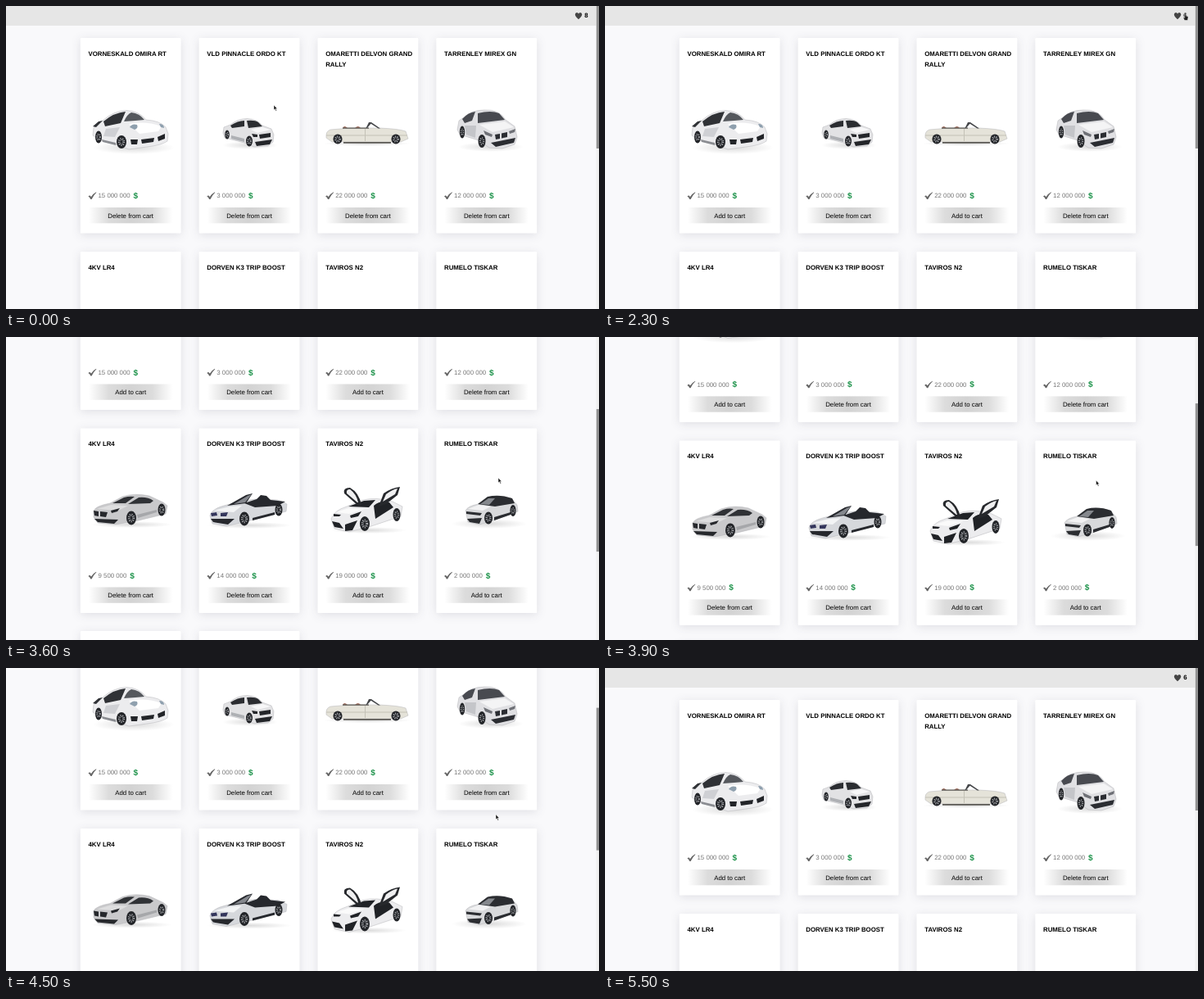
An HTML page for the animation above (5700 ms loop, 724 by 370 pixels).

```html
<!DOCTYPE html>
<html lang="en">
<head>
<meta charset="utf-8">
<title>Car shop</title>
<style>
  html, body { margin: 0; width: 100%; height: 100%; overflow: hidden; background: #f9f9fb; }
  svg { display: block; }
  text { font: 7.83px "Liberation Sans", Arial, sans-serif; white-space: pre; text-rendering: geometricPrecision; }
  .bold { font-weight: bold; }
  .card { fill: #fff; filter: drop-shadow(0 2px 6px rgba(30, 30, 60, .12)); }
  .price { fill: #777; }
  .dollar { font-size: 10px; font-weight: bold; fill: #1a9148; }
  .button { text-anchor: middle; }
</style>
</head>
<body>
<svg width="724" height="370" viewBox="0 0 724 370">
  <defs>
    <linearGradient id="fade">
      <stop offset="0" stop-color="#fff"/>
      <stop offset=".24" stop-color="#dcdcdc"/>
      <stop offset=".5" stop-color="#d3d3d3"/>
      <stop offset=".76" stop-color="#dcdcdc"/>
      <stop offset="1" stop-color="#fff"/>
    </linearGradient>
    <radialGradient id="shade">
      <stop offset="0" stop-color="#000" stop-opacity=".14"/>
      <stop offset="1" stop-color="#000" stop-opacity="0"/>
    </radialGradient>
  </defs>
  <g id="page">
    <rect width="724" height="24" fill="#e6e6e6"/>
    <path fill="#444" d="M699 16.2 Q694.8 12.8 694.8 10.3 Q694.9 8 697 7.9 Q698.5 8 699 9.4 Q699.6 8 701.1 7.9 Q703.2 8 703.3 10.3 Q703.2 12.8 699 16.2Z"/>
    <text id="count" class="bold" x="706.3" y="14.4">8</text>
    <g id="cards"></g>
  </g>
  <rect x="720.5" width="3.5" height="370" fill="#f0f0f0"/>
  <rect id="thumb" x="720.8" width="3.2" height="174" fill="#929292"/>
  <g id="cursor" stroke-linejoin="round">
    <path id="arrow" fill="#111" stroke="#fff" stroke-width=".5" d="M0 0 V6 L1.4 4.8 L2.5 7.3 L3.5 6.8 L2.4 4.5 H4.2Z"/>
    <path id="hand" fill="#222" stroke="#fff" stroke-width=".5" d="M-1.3 .8 Q-.5 -.6 .3 .8 V4 L2.6 4.7 Q3.2 5 3 6 L2.4 9.6 H-1.4 L-3 6.6 Q-2.8 5.4 -1.3 6.3Z"/>
    <path id="beam" fill="none" stroke="#111" stroke-width=".8" d="M-.9 .3 H2.1 M.6 .3 V6.4"/>
  </g>
</svg>
<script>
const LOOP = 5700, STEP = 100, PAGE = 792, VIEW = 370;
const $ = id => document.getElementById(id);

function add(parent, tag, attrs, text) {
  const el = document.createElementNS("http://www.w3.org/2000/svg", tag);
  for (const k in attrs) el.setAttribute(k, attrs[k]);
  if (text) el.textContent = text;
  return parent.appendChild(el);
}

// Each car: ground shadow, wheels (cx, cy, rx, ry) and flat shapes, body first.
const cars = [
  { shade: [156, 173, 50, 8], wheels: [[141, 166, 6, 8], [113, 160, 4, 7.5]], shapes: [
    ["#ececee", "M106 158 L107 149 Q110 143 118 140 Q131 128 147 127.5 Q162 128 171 139 Q188 140 195 148 L198 156 L197 165 Q190 170 172 172 L150 175 L134 169 L117 165Z"],
    ["#303236", "M119 141 Q132 130 146 129 L140 143 L121 147Z M106 147 L113 141 L118 140 L110 148Z"],
    ["#55585d", "M144 141 Q148 132 153 130 Q163 131 169 139 L158 140Z"],
    ["#cfd0d4", "M122 150 L139 148 L133 160 L119 159Z"],
    ["#8b8d92", "M117 163 L134 167 V170 L118 166Z"],
    ["#fff", "M150 144 Q170 140 190 147 L186 153 L163 156Z"],
    ["#8fa0ae", "M151 148 Q154 143 160 145 Q162 149 157 151Z M187 144 Q193 144 193 149 L189 148Z"],
    ["#222428", "M152 163 L161 163 L160 169 L153 169Z M165 163 L181 161 L180 166 L166 168Z M185 160 L194 156 L194 162 L186 165Z"]] },
  { shade: [298, 170, 34, 5], wheels: [[297, 165, 4, 6.5], [270, 157, 2.8, 5.5]], shapes: [
    ["#e2e2e4", "M265 155 L266 148 L274 145 Q282 138 294 137.5 Q307 138 313 146 L324 150 L327 157 L326 166 L320 171 L303 172 L291 167 L267 161Z"],
    ["#2b2d31", "M274 146 Q283 140 291 140 L291 147 L276 149Z M294 140 Q304 139 308 142 L313 147 L296 149Z"],
    ["#aeb0b4", "M275 158 L291 162 V166 L275 162Z"],
    ["#f7f7f8", "M299 151 L313 148 L323 151 L307 155Z"],
    ["#24262a", "M300 156 L307 157 V160 L302 160Z M309 157 L323 155 V160 L310 162Z M304 166 L325 163 L322 169 L306 171Z"]] },
  { shade: [441, 168, 54, 3], wheels: [[405, 162.5, 5.5, 6], [476, 162.5, 5.5, 6]], shapes: [
    ["#e5e3d9", "M391 161 Q390 153 396 151 L420 149 L456 149 Q480 150 488 153 L491 162 L482 166 H398Z"],
    ["#c4c1b6", "M391 157.5 H490 V158.5 H391Z M438 150 H439 V165 H438Z"],
    ["#9e6d5e", "M411 149 Q413 145 417 149 H426 Q430 145 433 149Z"],
    ["#5a5853", "M411 148.6 H443 V149.8 H411Z M412 166 H470 V167.8 H412Z"],
    ["#45474a", "M443 142 L446 142 L457 149.6 H454.5 L445.5 143.8 L441 149 H439.5Z"]] },
  { shade: [592, 172, 40, 6], wheels: [[581, 165, 4.5, 8], [557, 154, 3.2, 7.5]], shapes: [
    ["#e0e0e3", "M551 151 L553 140 L559 136 Q568 127 584 127 Q602 126 610 139 L621 147 L624 160 L621 169 L606 174 L590 173 L577 164 L554 157Z"],
    ["#484a50", "M557 138 Q564 130 573 129 L569 140 L560 143Z M576 131 Q592 127 602 131 L609 139 L576 143Z"],
    ["#c4c5c9", "M560 146 L574 146 L573 161 L562 157Z"],
    ["#f4f4f5", "M578 145 L609 141 L620 148 L594 154Z"],
    ["#6e7076", "M583 152 L594 157 L593 160 L585 157Z M614 153 L622 150 L621 154 L615 156Z"],
    ["#2b2d32", "M597 157 L603 156 V162 L598 163Z M605 155.5 L612 154 V160 L605 161.5Z M592 167 L622 161 L620 167 L598 172Z"]] },
  { shade: [153, 229, 50, 4], wheels: [[153, 221, 6, 8.5], [190, 211, 4.5, 7.5]], shapes: [
    ["#c9c9cb", "M107 212 Q110 206 127 203 L142 195 Q157 190 175 194 L192 202 L197 206 L195 216 L162 224 L134 229 L112 227 L107 220Z"],
    ["#303236", "M130 203 L144 196 Q151 194 157 195 L146 203Z M149 204 L162 196 Q173 195 180 200 L176 203Z"],
    ["#dededf", "M111 210 L128 205 L149 206 L137 212Z"],
    ["#a6a7aa", "M160 217 L184 211 V214 L161 221Z"],
    ["#26282c", "M107 212 L113 213 L113 219 L108 218Z M115 213 L124 214 L122 220 L115 219Z M128 212 L139 209 L136 213 L129 215Z M108 222 L137 223 L132 228 L112 226Z"]] },
  { shade: [297, 230, 52, 4], wheels: [[291, 222, 6, 8.5], [333, 211, 4.5, 7.5]], shapes: [
    ["#d6d8dc", "M249 218 Q251 210 266 206 L285 201 L304 198 L332 199 L343 204 L342 213 L299 224 L269 231 L252 228Z"],
    ["#26282d", "M270 206 L293 193 L301 191 L293 203Z M291 203 L306 198 L311 193 L318 194 L323 199 L341 201 L332 206 L304 208Z M250 222 L279 222 L271 229 L253 226Z M301 221 L328 214 V217 L301 224Z"],
    ["#84878d", "M295 194 L300 192 L292 202 L278 204Z"],
    ["#f3f4f5", "M253 212 L273 207 L288 206 L278 214Z"],
    ["#34365c", "M250 215 L257 214 L258 218 L251 219Z M262 215 L271 214 L269 219 L262 219Z"]] },
  { shade: [443, 236, 46, 4], wheels: [[438, 228, 6, 9], [477, 217, 4.5, 8]], shapes: [
    ["#ececee", "M397 222 Q400 212 416 207 L436 199 Q452 195 472 201 L484 207 L482 219 L446 231 L419 238 L401 234Z"],
    ["#202226", "M418 207 L437 200 L451 199 L443 208Z M449 206 Q457 199 468 202 L473 208 L451 222Z M398 225 L407 227 L412 234 L401 232Z M414 229 L429 224 L423 236 L414 237Z M400 216 L409 217 L407 219 L400 219Z M420 218 L434 213 L430 219 L421 221Z"],
    ["#fafafa", "M403 214 L418 209 L438 210 L419 216Z"],
    ["#26282c", "M431 207 L413 191 Q411 184 420 184 Q431 190 434 205Z M455 207 L461 191 Q471 184 481 183 L478 193 L464 204Z"],
    ["#efeff0", "M429 202 L416 191 Q415 186 420 186 Q428 192 430 202Z M460 201 L464 192 Q472 186 478 185 L475 192Z"]] },
  { shade: [590, 228, 46, 6], wheels: [[589, 221, 5, 7.5], [619, 212, 3.6, 7]], shapes: [
    ["#d8d9db", "M561 212 Q564 206 577 204 L587 196 Q602 192 617 197 L624 205 L625 213 L598 223 L578 229 L564 226Z"],
    ["#2b2d31", "M576 204 L588 195 Q602 191.5 618 197 L621 203 L597 207Z M562 213 L581 215 L579 218 L562 216Z M563 222 L581 221 L578 228 L566 226Z M596 220 L616 214 V217 L596 224Z"],
    ["#85888d", "M579 204 L589 197 L597 197 L590 205Z"],
    ["#f2f2f3", "M564 210 L577 205 L592 207 L582 212Z"]] }
];

function drawCar(parent, car, dy) {
  const g = add(parent, "g", { transform: `translate(0 ${dy})` });
  const oval = ([cx, cy, rx, ry], k, attrs) => add(g, "ellipse", { cx, cy, rx: rx * k, ry: ry * k, ...attrs });
  oval(car.shade, 1, { fill: "url(#shade)" });
  car.shapes.forEach(([fill, d], i) =>
    add(g, "path", { d, fill, stroke: i ? "none" : "#b4b4b8", "stroke-width": .5 }));
  for (const w of car.wheels) {
    oval(w, 1, { fill: "#222428" });
    oval(w, .45, { fill: "none", stroke: "#a4a6aa", "stroke-width": w[2] * .5, "stroke-dasharray": "1 1.2" });
  }
}

const stock = [
  [["VORNESKALD OMIRA RT"], "15 000 000", 1],
  [["VLD PINNACLE ORDO KT"], "3 000 000", 1],
  [["OMARETTI DELVON GRAND", "RALLY"], "22 000 000", 1],
  [["TARRENLEY MIREX GN"], "12 000 000", 1],
  [["4KV LR4"], "9 500 000", 1],
  [["DORVEN K3 TRIP BOOST"], "14 000 000", 1],
  [["TAVIROS N2"], "19 000 000", 0],
  [["RUMELO TISKAR"], "2 000 000", 0]
];
const rows = [[39, 277.6], [300, 525.6], [547.6, 772]];
const colX = i => 90.8 + i % 4 * 144.85;

function drawCard(i) {
  const x = colX(i), [top, bottom] = rows[i >> 2], g = add($("cards"), "g");
  add(g, "rect", { class: "card", x, y: top, width: 122.8, height: bottom - top, rx: 1.2 });
  if (!stock[i]) return;
  const [title, price] = stock[i];
  title.forEach((line, n) => add(g, "text", { class: "bold", x: x + 9.7, y: top + 21.7 + n * 13.2 }, line));
  drawCar(g, cars[i], i < 4 ? 0 : 188.5);
  add(g, "path", { fill: "#666", transform: `translate(${x + 9.6} ${bottom - 50.3})`,
    d: "M0 5.2 L1.8 3.9 L3.6 5.6 Q6 2 9.6 0 L10 .4 Q6.6 3.6 4.2 8.6 H2.9 Q1.8 6.2 0 5.2Z" });
  const label = add(g, "text", { class: "price", x: x + 21.7, y: bottom - 43.3 }, price);
  add(label, "tspan", { class: "dollar", dx: 3.8, dy: .7 }, "$");
  add(g, "rect", { x: x + 10, y: bottom - 31.6, width: 102.6, height: 19.3, fill: "url(#fade)" });
  return add(g, "text", { class: "button", x: x + 61.4, y: bottom - 19.1 }, "Add to cart");
}
const buttons = [0, 1, 2, 3, 4, 5, 6, 7, 8, 9].map(drawCard).slice(0, 8);

const clicks = [[600, 0], [1100, 1], [1400, 2], [1800, 1]];
const scrolls = [[0, 0], [3200, 0], [3300, 24], [3400, 78], [3500, 136], [3600, 188.5], [3700, 191],
  [3800, 185], [4200, 139.5], [4500, 104], [4700, 112], [4900, 135], [5000, 122], [5400, 14], [5500, 0]];
const moves = [
  [0, 327, 121, "arrow"], [400, 143, 261, "hand"], [600, 143, 261, "hand"], [700, 215, 259, "arrow"],
  [800, 288, 261, "hand"], [1100, 288, 261, "hand"], [1200, 362, 256, "arrow"], [1300, 434, 258, "hand"],
  [1500, 437, 257, "hand"], [1600, 437, 257, "hand"], [1700, 366, 255, "arrow"], [1800, 297, 257, "hand"],
  [1900, 360, 215, "arrow"], [2200, 709, 8, "hand"], [2300, 709, 8, "hand"], [2400, 705, 13, "arrow"],
  [2800, 679.5, 22.5, "arrow"], [3000, 683, 24, "arrow"], [3200, 683, 24, "arrow"], [3600, 601, 172, "arrow"],
  [4200, 598, 178, "arrow"], [4900, 598, 180, "beam"], [5000, 598, 178, "arrow"], [5400, 606, 60, "arrow"],
  [5500, 606, 60, "none"]
];

// The keys around t and the progress between them.
function span(keys, t) {
  const i = keys.findLastIndex(k => k[0] <= t), a = keys[i], b = keys[i + 1] || a;
  return [a, b, a === b ? 0 : (t - a[0]) / (b[0] - a[0])];
}
function at(keys, t, col) {
  const [a, b, k] = span(keys, t);
  return a[col] + (b[col] - a[col]) * k;
}
// A pointer moving between two different places shows as an arrow.
function pointer(t) {
  const [a, b, k] = span(moves, t);
  return !k || a[3] === b[3] ? a[3] : "arrow";
}

function render(t) {
  const inCart = stock.map(s => s[2]);
  let count = 8;
  for (const [time, i] of clicks) if (t >= time) {
    count += inCart[i] ? -1 : 1;
    inCart[i] ^= 1;
  }
  buttons.forEach((b, i) => b.textContent = inCart[i] ? "Delete from cart" : "Add to cart");
  $("count").textContent = count;
  const y = at(scrolls, t, 1), kind = pointer(t);
  $("page").setAttribute("transform", `translate(0 ${-y})`);
  $("thumb").setAttribute("y", y * VIEW / PAGE);
  $("cursor").setAttribute("transform", `translate(${at(moves, t, 1)} ${at(moves, t, 2)})`);
  for (const id of ["arrow", "hand", "beam"]) $(id).style.display = id === kind ? "" : "none";
}

const start = performance.now();
function tick() {
  const t = (performance.now() - start) % LOOP;
  render(Math.floor(t / STEP) * STEP);
  requestAnimationFrame(tick);
}
tick();
</script>
</body>
</html>
```
